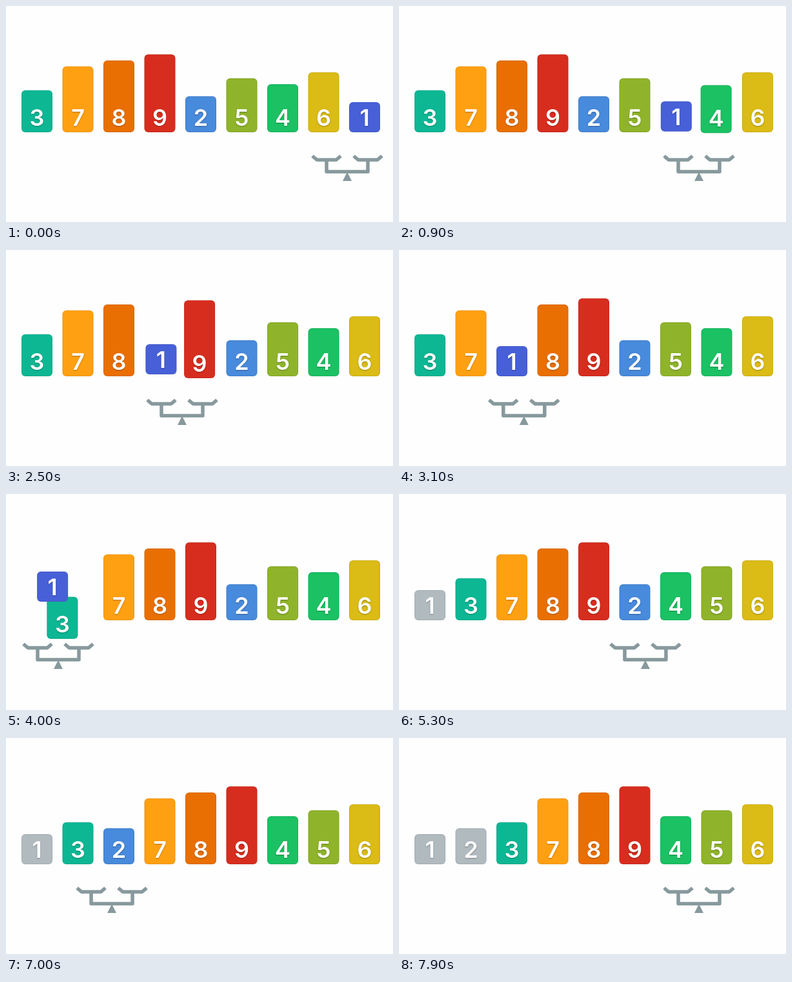
An HTML page with a canvas for the animation above (8000 ms loop, 600x337 px).

```html
<!DOCTYPE html>
<html lang="en">
<head>
<meta charset="utf-8">
<title>Bubble sort</title>
<style>
  html, body { margin: 0; height: 100%; overflow: hidden; background: #fefefe; }
  canvas { display: block; }
</style>
</head>
<body>
<canvas id="stage" width="600" height="337"></canvas>
<script>
const ctx = document.getElementById('stage').getContext('2d');

const LOOP = 8000;
const SWAP = 300, MOVE = 235, LOOK = 138, PASS_PAUSE = 70;
const GAP = 63.5, FLOOR = 197, LIFT = 31.3;
const GREY = '#b1babf', STEEL = '#87999d';
const COLORS = ['', '#4760d8', '#488adb', '#0db794', '#1bc163', '#8fb42b',
                '#dbbb15', '#ffa012', '#e96f02', '#d72d1f'];

// Bubble sort from the right, recorded as timed steps.
function plan(order) {
  const steps = [];
  let time = 0;
  const add = (kind, pair, sorted, length) => {
    steps.push({ kind, pair, sorted, start: time, length, order: [...order] });
    time += length;
  };
  for (let sorted = 0; sorted < order.length - 1 && time < LOOP; sorted++) {
    add('rest', order.length - 2, sorted, PASS_PAUSE);
    for (let i = order.length - 2; i >= sorted; i--) {
      if (order[i] > order[i + 1]) {
        add('swap', i, sorted, SWAP);
        [order[i], order[i + 1]] = [order[i + 1], order[i]];
      } else {
        add('rest', i, sorted, LOOK);
      }
      if (i > sorted) add('move', i, sorted, MOVE);
    }
  }
  return steps;
}

const steps = plan([3, 7, 8, 9, 2, 5, 4, 6, 1]);

function drawBlock(value, slot, dy, color) {
  const h = 47 + (value - 1) * 9.3;
  const x = 24 + slot * GAP, bottom = FLOOR + dy;
  ctx.fillStyle = color;
  ctx.beginPath();
  ctx.roundRect(x, bottom - h, 48, h, 6);
  ctx.fill();
  ctx.strokeStyle = 'rgba(0,0,0,.08)';
  ctx.lineWidth = 1;
  ctx.beginPath();
  ctx.roundRect(x + .5, bottom - h + .5, 47, h - 1, 5.5);
  ctx.stroke();

  ctx.save();
  ctx.shadowColor = 'rgba(0,0,0,.3)';
  ctx.shadowBlur = 2;
  ctx.shadowOffsetY = 1;
  ctx.fillStyle = '#fff';
  ctx.fillText(value, x + 24, bottom - 10);
  ctx.restore();
}

function drawScale(x) {
  ctx.save();
  ctx.translate(x, 0);
  ctx.strokeStyle = ctx.fillStyle = STEEL;
  ctx.lineJoin = 'round';
  ctx.lineWidth = 5.5;
  ctx.beginPath();
  for (const c of [-32, 32]) {
    ctx.moveTo(c - 22, 234);
    ctx.lineTo(c - 15, 240);
    ctx.lineTo(c + 15, 240);
    ctx.lineTo(c + 22, 234);
  }
  ctx.moveTo(-32, 240);
  ctx.lineTo(-32, 258.5);
  ctx.lineTo(32, 258.5);
  ctx.lineTo(32, 240);
  ctx.stroke();
  ctx.beginPath();
  ctx.moveTo(0, 259);
  ctx.lineTo(7, 273);
  ctx.lineTo(-7, 273);
  ctx.fill();
  ctx.restore();
}

function draw(time) {
  const step = steps.findLast(s => s.start <= time);
  const { kind, pair, order, sorted } = step;
  const p = Math.min(1, (time - step.start) / step.length);

  ctx.fillStyle = '#fefefe';
  ctx.fillRect(0, 0, 600, 337);
  ctx.font = '600 36px Inter, "Open Sans", sans-serif';
  ctx.textAlign = 'center';

  drawScale(81 + 64 * (pair - (kind === 'move' ? p : 0)));
  order.forEach((value, i) => {
    const side = kind !== 'swap' ? 0 : i === pair ? 1 : i === pair + 1 ? -1 : 0;
    const dy = side * LIFT * Math.sin(Math.PI * p);
    drawBlock(value, i + side * p, dy, i < sorted ? GREY : COLORS[value]);
  });
}

const origin = performance.now();
function tick() {
  draw((performance.now() - origin) % LOOP);
  requestAnimationFrame(tick);
}
tick();
</script>
</body>
</html>
```
